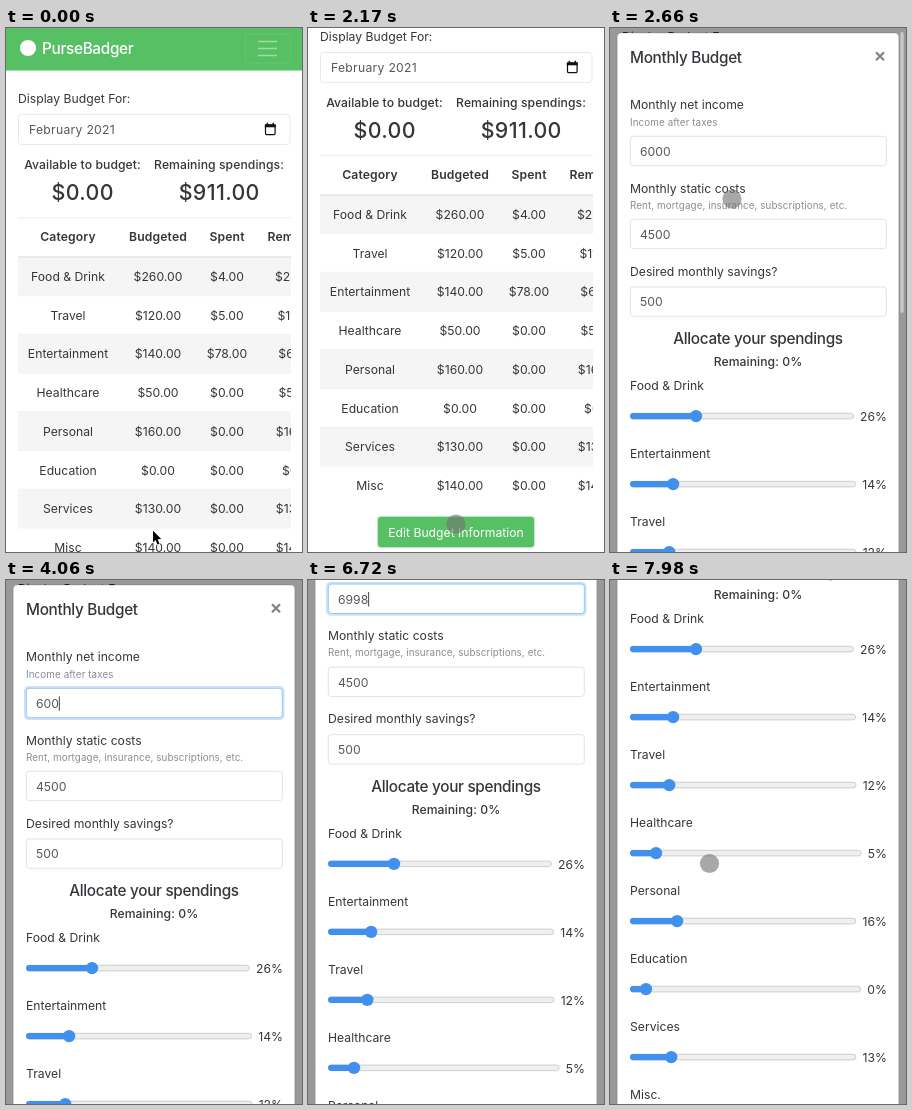
An HTML page with a canvas for the animation above (8000 ms loop, 296x524 px).

```html
<!DOCTYPE html>
<html lang="en">
<head>
<meta charset="utf-8">
<title>Budget planner</title>
<style>
  html, body { margin: 0; width: 100%; height: 100%; overflow: hidden; background: #fff; }
  canvas { display: block; width: 296px; height: 524px; }
</style>
</head>
<body>
<canvas id="stage"></canvas>
<script>
const W = 296, H = 524, LOOP = 8000, STEP = 70;
const canvas = document.getElementById('stage');
const ctx = canvas.getContext('2d');
const dpr = window.devicePixelRatio || 1;
canvas.width = W * dpr;
canvas.height = H * dpr;

const GREEN = '#58c064', GREEN_ACTIVE = '#4aa557', BLUE = '#4190ee', INK = '#33373b', FIELD = '#53585e';
const BODY = 12.2, SMALL = 9.8, TITLE = 15.3, BIG = 21.4;
// letter spacing in em for each size
const TRACKING = { [BODY]: 0, [SMALL]: 0.01, [TITLE]: -0.02, [BIG]: 0.016 };

const clamp = v => Math.max(0, Math.min(1, v));
const span = (t, a, b) => clamp((t - a) / (b - a));
const smooth = u => u * u * (3 - 2 * u);
const lerp = (a, b, u) => a + (b - a) * u;
const fling = u => smooth(Math.pow(u, 0.74));

// y is the middle of the capitals
function text(str, x, y, { size = BODY, weight = 400, color = INK, align = 'left', tracking = TRACKING[size] } = {}) {
  ctx.font = `${weight} ${size}px Inter, "Open Sans", sans-serif`;
  ctx.letterSpacing = `${size * tracking}px`;
  ctx.textAlign = align;
  ctx.fillStyle = color;
  ctx.fillText(str, x, y + size * 0.36);
}

function box(x, y, w, h, r, fill, stroke, lw = 0.9) {
  ctx.beginPath();
  ctx.roundRect(x, y, w, h, r);
  if (fill) { ctx.fillStyle = fill; ctx.fill(); }
  if (stroke) { ctx.strokeStyle = stroke; ctx.lineWidth = lw; ctx.stroke(); }
}

function line(x1, y1, x2, y2, color, lw) {
  ctx.beginPath();
  ctx.moveTo(x1, y1);
  ctx.lineTo(x2, y2);
  ctx.strokeStyle = color;
  ctx.lineWidth = lw;
  ctx.stroke();
}

function disc(x, y, r, fill) {
  ctx.beginPath();
  ctx.arc(x, y, r, 0, Math.PI * 2);
  ctx.fillStyle = fill;
  ctx.fill();
}

const budget = [
  ['Food & Drink', 260, 4], ['Travel', 120, 5], ['Entertainment', 140, 78],
  ['Healthcare', 50, 0], ['Personal', 160, 0], ['Education', 0, 0],
  ['Services', 130, 0], ['Misc', 140, 0]
];
const columns = [62, 152, 221, 293];
const money = v => '$' + v.toFixed(2);

function drawHeader() {
  ctx.fillStyle = GREEN;
  ctx.fillRect(0, 0, W, 42.5);
  disc(22, 20, 8, '#fff');
  text('PurseBadger', 36, 20.5, { size: TITLE, weight: 500, color: '#fff' });
  box(239.5, 6, 44.5, 29, 3, null, 'rgba(255,255,255,.1)');
  for (const y of [13.5, 20.5, 27.5]) line(252, y, 271, y, 'rgba(255,255,255,.42)', 1.5);
}

function drawCalendar(x, y) {
  box(x + 0.7, y + 1.7, 9.6, 9.6, 1, null, '#111', 1.2);
  ctx.fillStyle = '#111';
  ctx.fillRect(x, y + 1, 11, 3);
  ctx.fillRect(x + 1.8, y - 0.5, 1.5, 2);
  ctx.fillRect(x + 7.7, y - 0.5, 1.5, 2);
}

function drawTable() {
  const top = 229, pitch = 38.7;
  ctx.save();
  ctx.beginPath();
  ctx.rect(12, 185, 273, 360);
  ctx.clip();
  line(12, 189.8, 285, 189.8, '#e8eaec', 0.9);
  ['Category', 'Budgeted', 'Spent', 'Remaining'].forEach((label, i) =>
    text(label, columns[i], 209, { weight: 600, align: 'center', tracking: 0.01 }));
  budget.forEach(([name, planned, spent], i) => {
    const y = top + i * pitch;
    if (i % 2 === 0) {
      ctx.fillStyle = '#f5f5f5';
      ctx.fillRect(12, y, 273, pitch);
    }
    line(12, y, 285, y, i ? '#eff0f1' : '#e3e5e8', i ? 0.8 : 1.6);
    [name, money(planned), money(spent), money(planned - spent)].forEach((cell, c) =>
      text(cell, columns[c], y + 19.65, { align: 'center' }));
  });
  ctx.restore();
}

function drawButton(active) {
  if (active) box(68.5, 549.5, 159, 33, 4, 'rgba(88,192,100,.6)');
  else box(69.3, 550.3, 157.4, 31.4, 3.6, 'rgba(88,192,100,.5)');
  box(70, 551, 156, 30, 3, active ? GREEN_ACTIVE : GREEN);
  text('Edit Budget Information', 148, 566.5, { color: '#fff', align: 'center' });
}

function drawPage(t) {
  ctx.save();
  ctx.translate(0, -62 * fling(span(t, 0, 840)));
  drawHeader();
  text('Display Budget For:', 12, 71);
  box(12.5, 86.5, 271.5, 30, 3, '#fff', '#e4e7ea');
  text('February 2021', 23, 101.8, { color: FIELD, tracking: 0.022 });
  drawCalendar(258.8, 95.3);
  const mid = { weight: 500, align: 'center' };
  text('Available to budget:', 76.5, 137, { ...mid, tracking: 0.005 });
  text('Remaining spendings:', 213, 137, { ...mid, tracking: 0.005 });
  text('$0.00', 76.7, 164.5, { ...mid, size: BIG });
  text('$911.00', 213.2, 164.5, { ...mid, size: BIG });
  drawTable();
  drawButton(t >= 2240);
  ctx.restore();
}

const sliders = [
  ['Food & Drink', 26], ['Entertainment', 14], ['Travel', 12], ['Healthcare', 5],
  ['Personal', 16], ['Education', 0], ['Services', 13], ['Misc.', 14]
];

// [time, value] as the field is edited
const edits = [
  [0, '6000'], [4060, '600'], [4200, '60'], [4340, '6'], [4480, ''],
  [4970, '7'], [5110, '70'], [5250, '700'], [5740, '7000'], [6580, '6999'], [6650, '6998']
];
const incomeAt = t => edits.filter(e => e[0] <= t).pop()[1];

function drawInput(y, value, focused, caret) {
  if (focused) box(18, y - 2.2, 260.5, 34, 4.5, 'rgba(70,150,235,.28)');
  box(20.3, y, 256, 29.4, 3, '#fff', focused ? '#8cc2f5' : '#dde0e4');
  text(value, 30, y + 15.2, { color: FIELD });
  if (caret) {
    const x = 30.4 + (value ? ctx.measureText(value).width : 0);
    line(x, y + 8, x, y + 22.5, '#333', 0.9);
  }
}

function drawSlider(name, percent, y) {
  text(name, 20, y);
  const label = percent + '%', ty = y + 30.5;
  text(label, 277, ty + 0.3, { align: 'right' });
  const w = 250 - ctx.measureText(label).width;
  const x = 26.3 + (w - 12.6) * (0.0444 + 0.0092 * percent);
  box(20.4, ty - 2.8, w, 5.6, 2.8, '#efefef', '#c6c6c6', 0.8);
  box(20, ty - 3.1, x - 20, 6.2, 3.1, BLUE);
  disc(x, ty, 6.2, BLUE);
}

function drawModal(t) {
  const shown = span(t, 2310, 2460);
  if (!shown) return;
  const slide = 1 - Math.pow(1 - span(t, 2310, 2610), 2);
  const focused = t >= 3360;
  const caret = focused && !(t >= 6300 && t < 6580);
  ctx.save();
  ctx.globalAlpha = shown;
  ctx.translate(0, -40 * (1 - slide) - 319 * fling(span(t, 6510, 7280)));
  box(7.2, 5, 281.6, 1000, 4, '#fff', 'rgba(0,0,0,.2)', 0.8);
  text('Monthly Budget', 20, 29.5, { size: TITLE, weight: 500 });
  line(266, 24.3, 274, 32.3, '#858585', 2.3);
  line(274, 24.3, 266, 32.3, '#858585', 2.3);

  const hint = { size: SMALL, color: '#868d94' };
  text('Monthly net income', 20, 77);
  text('Income after taxes', 20, 94, hint);
  drawInput(108.3, incomeAt(t), focused, caret);
  text('Monthly static costs', 20, 160.3);
  text('Rent, mortgage, insurance, subscriptions, etc.', 20, 177, hint);
  drawInput(191.3, '4500');
  text('Desired monthly savings?', 20, 243.3);
  drawInput(258.9, '500');
  text('Allocate your spendings', 148, 310.4, { size: TITLE, weight: 500, align: 'center' });
  text('Remaining: 0%', 148, 333.7, { weight: 500, align: 'center', tracking: 0.005 });
  sliders.forEach(([name, percent], i) => drawSlider(name, percent, 357.6 + 68 * i));
  ctx.restore();

  const bar = shown * (1 - span(t, 2800, 3010));
  if (bar) box(290.3, 4, 3.4, 281, 1.7, `rgba(255,255,255,${0.45 * bar})`);
}

function drawArrow(x, y) {
  ctx.save();
  ctx.translate(x, y);
  ctx.scale(0.86, 0.86);
  ctx.beginPath();
  ctx.moveTo(0, 0);
  for (const [px, py] of [[0, 13.5], [3, 10.8], [5.2, 16], [7.6, 15], [5.4, 9.9], [9.6, 9.6]]) {
    ctx.lineTo(px, py);
  }
  ctx.closePath();
  ctx.lineJoin = 'round';
  ctx.lineWidth = 2;
  ctx.strokeStyle = '#fff';
  ctx.stroke();
  ctx.fillStyle = '#000';
  ctx.fill();
  ctx.restore();
}

// Pointer path: [time, x, y]
const path = [
  [910, 147, 503], [1190, 146, 468], [1470, 146, 468], [2170, 148, 496], [2310, 148, 496],
  [2660, 122, 171], [3010, 130, 142], [3150, 109, 120], [3220, 120, 130], [3920, 120, 130],
  [7700, 113, 247], [7770, 113, 247], [7840, 99.5, 283.5], [8000, 99.5, 283.5]
];

function drawPointer(t) {
  if (t < 910) return drawArrow(147, 502.8);
  if (t >= 3920 && t < 7700) return;
  const i = path.findIndex(p => p[0] > t);
  const [t0, x0, y0] = path[i - 1], [t1, x1, y1] = path[i];
  const u = smooth(span(t, t0, t1));
  const x = lerp(x0, x1, u), y = lerp(y0, y1, u);
  const pressed = (t >= 2240 && t <= 2310) || (t >= 3360 && t <= 3430);
  disc(x, y, pressed ? 10.5 : 9.6, pressed ? 'rgba(50,50,50,.5)' : 'rgba(115,115,115,.62)');
  if (pressed) {
    ctx.strokeStyle = 'rgba(255,255,255,.72)';
    ctx.lineWidth = 1.8;
    ctx.stroke();
  }
}

function draw(t) {
  ctx.setTransform(dpr, 0, 0, dpr, 0, 0);
  ctx.fillStyle = '#fff';
  ctx.fillRect(0, 0, W, H);
  drawPage(t);
  ctx.fillStyle = `rgba(0,0,0,${0.4 * span(t, 2175, 2325)})`;
  ctx.fillRect(0, 0, W, H);
  drawModal(t);
  drawPointer(t);
}

const start = performance.now();
function tick() {
  const t = (performance.now() - start) % LOOP;
  draw(Math.floor(t / STEP) * STEP);
  requestAnimationFrame(tick);
}
tick();
</script>
</body>
</html>
```
